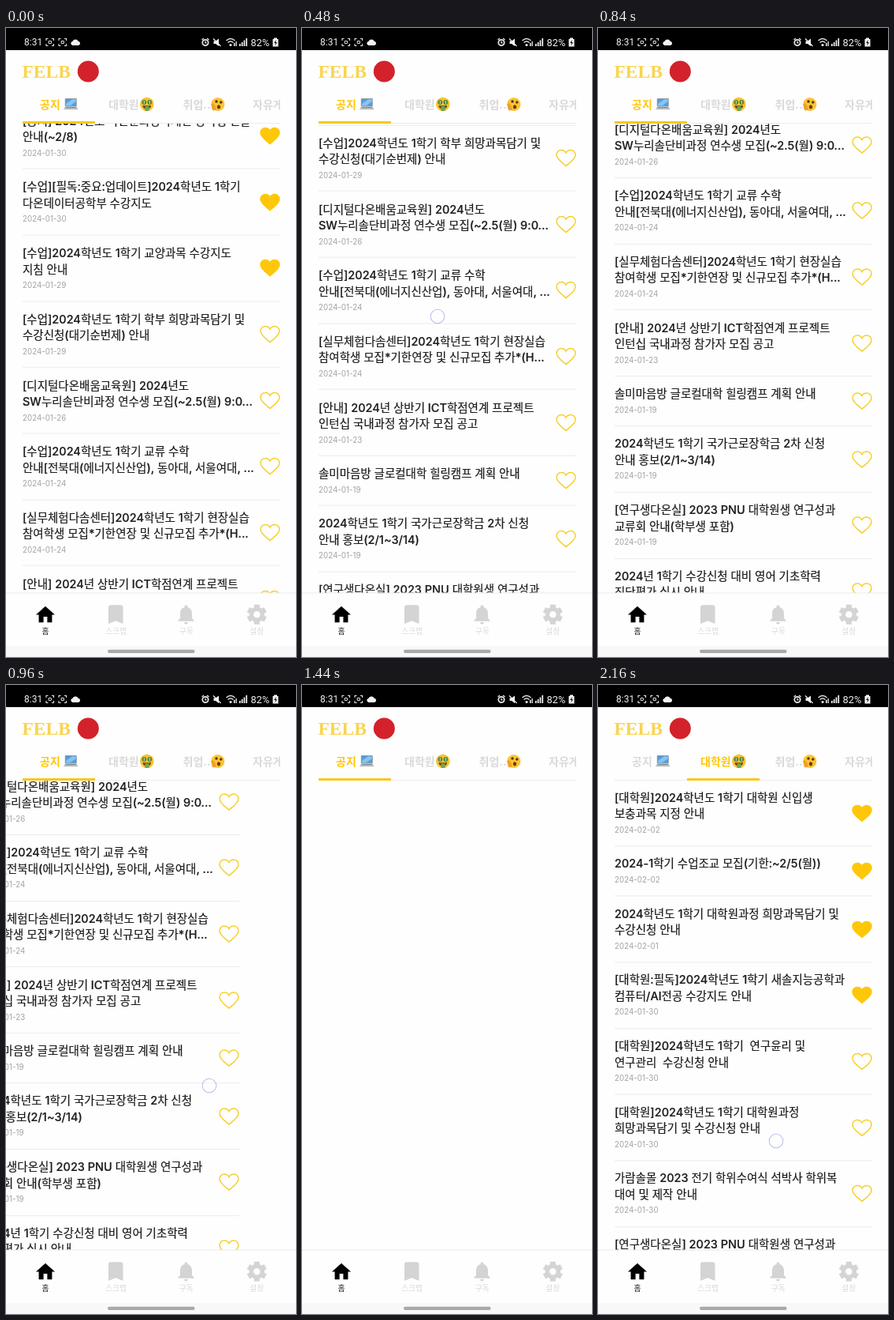
These frames come from a looping animation (368 by 796 pixels, 2280 ms). An HTML page:

```html
<!DOCTYPE html>
<html lang="ko">
<head>
<meta charset="utf-8">
<title>공지 목록</title>
<style>
  html, body { margin: 0; width: 368px; height: 796px; overflow: hidden; background: #fefefe; }
  body { position: relative; font-family: Inter, "Noto Sans CJK KR", "Noto Sans CJK", sans-serif; }
  #view { position: absolute; left: 0; top: 120px; width: 368px; height: 595px; overflow: hidden; }
  .page { position: absolute; left: 0; top: 0; width: 368px; }
  .item { position: relative; box-sizing: border-box; margin: 0 20px 0 21px; padding: 12.8px 0 9.4px; }
  .item::after { content: ""; position: absolute; left: 0; right: 0; bottom: -.5px; height: 1px; background: #ececec; }
  .title, .date { line-height: 20.5px; white-space: pre; }
  .title { font-size: 14.5px; font-weight: 500; color: #1c1c1c; -webkit-text-stroke: .2px #1c1c1c; }
  .date { font-size: 9.8px; color: #a2a2a2; }
  .heart { position: absolute; right: 0; top: calc(50% - 11px); width: 26px; height: 22px; fill: none; stroke: #f7cf2d; stroke-width: 1.5; overflow: visible; }
  .heart.on { fill: #ffc70a; stroke: #ffc70a; }
  #chrome { position: absolute; left: 0; top: 0; display: block; }
  .tab { font-size: 14px; font-weight: 700; fill: #d9d9d9; }
  .nav { font-size: 9.8px; text-anchor: middle; fill: #dadada; }
  .status { font-family: Roboto, sans-serif; fill: #f2f2f2; }
</style>
</head>
<body>
<div id="view">
  <div class="page" id="notice"></div>
  <div class="page" id="grad"></div>
</div>

<svg id="chrome" width="368" height="796" viewBox="0 0 368 796">
  <defs><clipPath id="tabClip"><rect x="21" y="80" width="327" height="42"/></clipPath></defs>

  <!-- status bar -->
  <rect width="368" height="28"/>
  <text class="status" x="23" y="22.4" font-size="12">8:31</text>
  <g fill="none" stroke="#e4e4e4" stroke-width="1.1">
    <g id="capture"><path d="M51 16v-2.500h2.500M58 13.500h2.500v2.500M60.500 20v2.500h-2.500M53.500 22.500h-2.500v-2.500"/><circle cx="55.800" cy="18" r="1.800"/></g>
    <use href="#capture" x="16"/>
    <path d="M279.500 16q5.500-5 11 0M281.500 18.500q3.500-3 7 0" stroke-width="1.400"/>
    <circle cx="253" cy="18.500" r="3.700" stroke-width="1.800"/>
    <path d="M248.500 15l2.500-2M257.500 15l-2.500-2M253 16.500v2.300h1.600" stroke-width="1.300"/>
    <path d="M263 13.500l9.500 9.500" stroke-width="1.400"/>
  </g>
  <g fill="#f2f2f2">
    <path d="M84.500 22a2.700 2.700 0 0 1 0-5.300a4 4 0 0 1 7.200 0a2.700 2.700 0 0 1 .3 5.300z"/>
    <path d="M263.500 16.500h2.500l4-3v9.500l-4-3h-2.500z"/>
    <circle cx="285" cy="21.500" r="1.500"/>
    <path d="M289 19h1.500v4h-1.500zM291.500 17h1.300v6h-1.300zM296 20h1.700v3h-1.700zM298.800 18h1.700v5h-1.700zM301.600 15.500h1.700v7.500h-1.700zM304.400 13h1.700v10h-1.700z"/>
    <path d="M340 12.500h4v1.500h1.500v9.500h-7v-9.500h1.500z"/>
  </g>
  <path d="M342.800 15l-2.600 4h1.800l-.6 3.300 2.600-4h-1.800z"/>
  <text class="status" x="310.500" y="22.800" font-size="12.800">82%</text>

  <!-- header -->
  <text x="20.500" y="63" font-family="Liberation Serif, serif" font-weight="700" font-size="23.500" fill="#fad44f">FELB</text>
  <circle cx="104.300" cy="55" r="13.500" fill="#d3222b"/>

  <!-- tabs -->
  <g clip-path="url(#tabClip)">
    <rect x="21" y="120" width="327" height="1" fill="#ececec"/>
    <text class="tab" id="tab1" x="43" y="101.500">공지</text>
    <text class="tab" id="tab2" x="130" y="101.500">대학원</text>
    <text class="tab" x="224.500" y="101.500">취업..</text>
    <text class="tab" x="313" y="101.500">자유게시판</text>
    <rect id="bar" x="21" y="118" width="92" height="3" fill="#f9c81c"/>
  </g>
  <g>
    <rect x="74.800" y="89" width="15" height="10.500" rx="1" fill="#8d979f"/>
    <path d="M76 90.200h12.600v8h-12.600z" fill="#4f9ee2"/>
    <path d="M76 96l8-5.800h4.600v3l-7 5h-5.600z" fill="#86c5f3"/>
    <path d="M74.800 99.500h15l1.700 3.700h-18.400z" fill="#b9c1c7"/>
    <path d="M76 100.700h12.600" stroke="#6f7a82" stroke-width="1"/>
  </g>
  <g>
    <circle cx="178.800" cy="96.500" r="8.800" fill="#fbc22f"/>
    <circle cx="175.300" cy="94" r="2.900" fill="#4d8a3c"/>
    <circle cx="182.300" cy="94" r="2.900" fill="#4d8a3c"/>
    <path d="M175.300 92v4M182.300 92v4" stroke="#d7e8b0" stroke-width="1"/>
    <path d="M173.300 98.200h11q-1 4.300-5.500 4.300t-5.500-4.300z" fill="#6a3a17"/>
    <path d="M176.500 99h5v6h-5z" fill="#6ea552"/>
  </g>
  <g>
    <circle cx="268.800" cy="96.500" r="8.600" fill="#fbc433"/>
    <circle cx="267" cy="93" r="1.700" fill="#5b3518"/>
    <circle cx="272.800" cy="94" r="1.700" fill="#5b3518"/>
    <ellipse cx="270" cy="99.800" rx="2.200" ry="2.600" fill="#6d3b18"/>
    <path d="M260.300 96q3-2 4.500 1.500l2 4q-1 4-5 2.300z" fill="#eea02a"/>
  </g>

  <!-- bottom navigation -->
  <rect y="715" width="368" height="67" fill="#fefefe"/>
  <rect y="714.500" width="368" height="1" fill="#ececec"/>
  <path transform="translate(35.600 728.200) scale(1.200)" d="M10 20v-6h4v6h5v-8h3L12 3 2 12h3v8z"/>
  <g fill="#d4d4d4" stroke="none">
    <path transform="translate(123.400 726.400) scale(1.320)" d="M17 3H7c-1.100 0-2 .9-2 2v16l7-3 7 3V5c0-1.100-.9-2-2-2z"/>
    <path transform="translate(213.500 727) scale(1.250)" d="M12 22c1.100 0 2-.9 2-2h-4c0 1.100.9 2 2 2zm6-6v-5c0-3-1.600-5.600-4.500-6.300V4a1.500 1.500 0 0 0-3 0v.7C7.600 5.400 6 8 6 11v5l-2 2v1h16v-1l-2-2z"/>
  </g>
  <g id="gear" transform="translate(318.300 742.200)" stroke="#d4d4d4" fill="none">
    <circle r="7" stroke-width="5.400"/>
  </g>
  <text class="nav" x="50" y="767" style="fill:#222">홈</text>
  <text class="nav" x="139.500" y="767">스크랩</text>
  <text class="nav" x="228.700" y="767">구독</text>
  <text class="nav" x="318.300" y="767">설정</text>
  <rect y="782" width="368" height="14" fill="#f8f8f8"/>
  <rect x="129" y="786.700" width="110.500" height="4.300" rx="2.100" fill="#a9a9a9"/>

  <path id="spinner" fill="none" stroke="#fac515" stroke-width="4.500"/>
  <circle id="touch" r="8.800" fill="#fff" fill-opacity=".35" stroke="#bcc2e6" stroke-width="1.100"/>
</svg>

<script>
const STEP = 120, LOOP = 2280;
const YELLOW = [255, 198, 10], GREY = [217, 217, 217];
const $ = id => document.getElementById(id);

// title lines split by "|", month-day, liked
const notices = [
  ['[공지] 2024년도 다온문화장학재단 장학생 선발|안내(~2/8)', '01-30', 1],
  ['[수업][필독:중요:업데이트]2024학년도 1학기|다온데이터공학부 수강지도', '01-30', 1],
  ['[수업]2024학년도 1학기 교양과목 수강지도|지침 안내', '01-29', 1],
  ['[수업]2024학년도 1학기 학부 희망과목담기 및|수강신청(대기순번제) 안내', '01-29'],
  ['[디지털다온배움교육원] 2024년도|SW누리솔단비과정 연수생 모집(~2.5(월) 9:0...', '01-26'],
  ['[수업]2024학년도 1학기 교류 수학|안내[전북대(에너지신산업), 동아대, 서울여대, ...', '01-24'],
  ['[실무체험다솜센터]2024학년도 1학기 현장실습|참여학생 모집*기한연장 및 신규모집 추가*(H...', '01-24'],
  ['[안내] 2024년 상반기 ICT학점연계 프로젝트|인턴십 국내과정 참가자 모집 공고', '01-23'],
  ['솔미마음방 글로컬대학 힐링캠프 계획 안내', '01-19'],
  ['2024학년도 1학기 국가근로장학금 2차 신청|안내 홍보(2/1~3/14)', '01-19'],
  ['[연구생다온실] 2023 PNU 대학원생 연구성과|교류회 안내(학부생 포함)', '01-19'],
  ['2024년 1학기 수강신청 대비 영어 기초학력|진단평가 실시 안내', '01-19']
];
const gradNotices = [
  ['[대학원]2024학년도 1학기 대학원 신입생|보충과목 지정 안내', '02-02', 1],
  ['2024-1학기 수업조교 모집(기한:~2/5(월))', '02-02', 1],
  ['2024학년도 1학기 대학원과정 희망과목담기 및|수강신청 안내', '02-01', 1],
  ['[대학원:필독]2024학년도 1학기 새솔지능공학과|컴퓨터/AI전공 수강지도 안내', '01-30', 1],
  ['[대학원]2024학년도 1학기  연구윤리 및|연구관리  수강신청 안내', '01-30'],
  ['[대학원]2024학년도 1학기 대학원과정|희망과목담기 및 수강신청 안내', '01-30'],
  ['가람솔몰 2023 전기 학위수여식 석박사 학위복|대여 및 제작 안내', '01-30'],
  ['[연구생다온실] 2023 PNU 대학원생 연구성과|교류회 안내(학부생 포함)', '01-19']
];

const HEART = 'M13 21C9 17.500 1 12.500 1 7C1 3.500 3.700 1 7 1C9.500 1 11.800 2.300 13 4.600' +
  'C14.200 2.300 16.500 1 19 1C22.300 1 25 3.500 25 7C25 12.500 17 17.500 13 21Z';

const itemHtml = ([title, day, liked]) => `<div class="item">
  ${title.split('|').map(line => `<div class="title">${line}</div>`).join('')}
  <div class="date">2024-${day}</div>
  <svg class="heart${liked ? ' on' : ''}" viewBox="0 0 26 22"><path d="${HEART}"/></svg></div>`;

$('notice').innerHTML = notices.map(itemHtml).join('');
$('grad').innerHTML = gradNotices.map(itemHtml).join('');
for (let a = 0; a < 360; a += 60)
  $('gear').insertAdjacentHTML('beforeend', `<path d="M0-8V-12.500" stroke-width="7" transform="rotate(${a})"/>`);

// one value per step; the last one holds
const scroll = [0, -14, -50, -114, -223, -327, -325, -323.5];
const slide = [0, 0, 0, 0, 0, 0, 0, 0, -52, -184.5, -310, -355, -368];
const tabShift = { 15: .27, 16: .75, 17: 1, 18: 1 };
const touches = {
  2: [178, 505], 3: [176, 450], 4: [172, 365], 5: [168, 281],
  8: [258, 507], 9: [132, 508], 18: [226, 577]
};
const arcs = { 15: [15, 31], 16: [62, 150] };

const at = (list, i) => list[Math.min(i, list.length - 1)];
const clamp = v => Math.max(0, Math.min(1, v));
const tint = k => `rgb(${GREY.map((g, i) => Math.round(g + (YELLOW[i] - g) * clamp(k)))})`;

function arcPath([from, to]) {
  const point = deg => {
    const a = deg * Math.PI / 180;
    return `${184 + 24 * Math.sin(a)} ${418 - 24 * Math.cos(a)}`;
  };
  return `M${point(from)}A24 24 0 0 1 ${point(to)}`;
}

function render(ms) {
  const i = Math.floor(ms % LOOP / STEP);
  $('notice').style.transform = `translate(${at(slide, i)}px, ${-25.4 + at(scroll, i)}px)`;
  $('grad').style.transform = 'translateY(.4px)';
  $('grad').style.visibility = i >= 17 ? 'visible' : 'hidden';

  const p = tabShift[i] || 0;
  $('bar').setAttribute('x', 21 + 92 * p);
  $('tab1').style.fill = tint(1 - 2 * p);
  $('tab2').style.fill = tint(2 * p - 1);

  $('spinner').setAttribute('d', arcs[i] ? arcPath(arcs[i]) : '');

  const [x, y] = touches[i] || [-50, -50];
  $('touch').setAttribute('transform', `translate(${x} ${y})`);
}

const start = performance.now();
function tick() {
  render(performance.now() - start);
  requestAnimationFrame(tick);
}
tick();
</script>
</body>
</html>
```
